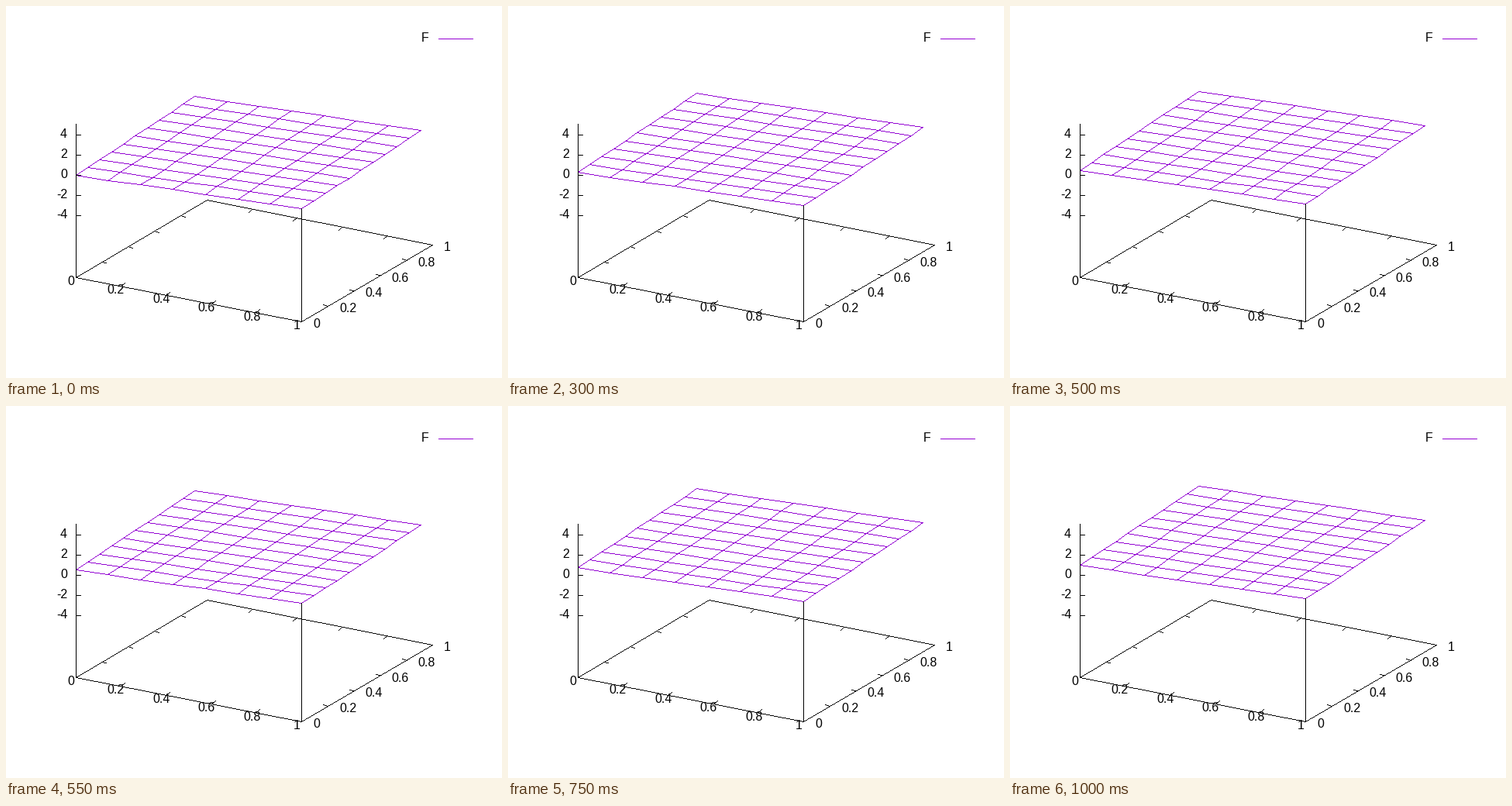
These frames come from a looping animation (640 by 480 pixels, 1050 ms). A matplotlib script:

```python
import numpy as np
import matplotlib.pyplot as plt
from matplotlib.animation import FuncAnimation

W, H = 640, 480
FRAMES = 21
VIOLET = (148, 0, 211)
BLACK = (0, 0, 0)
NX, NY = 7, 10

# Orthographic view: 60 degrees tilt, 30 degrees turn
CENTER = np.array((320, 230))
SCALE = np.array((338, 229))
SIN_TILT, COS_TILT = np.sin(np.pi / 3), np.cos(np.pi / 3)
SIN_TURN, COS_TURN = np.sin(np.pi / 6), np.cos(np.pi / 6)
Z_MIN, Z_MAX = -10, 5
TIC = 6

# Unit screen directions of the x and y axes
X_DIR = np.array((COS_TURN, SIN_TURN * COS_TILT))
Y_DIR = np.array((SIN_TURN, -COS_TURN * COS_TILT))
X_DIR, Y_DIR = X_DIR / np.hypot(*X_DIR), Y_DIR / np.hypot(*Y_DIR)

plt.rcParams["font.family"] = "Liberation Sans"
fig = plt.figure(figsize=(W / 100, H / 100), dpi=100, facecolor="white")


def project(x, y, z=Z_MIN, shift=(0, 0)):
    """Map a 3D point, moved by a pixel shift, to a whole pixel."""
    x, y, z = x - 0.5, y - 0.5, (z - Z_MIN) / (Z_MAX - Z_MIN) - 0.5
    right = x * COS_TURN + y * SIN_TURN
    down = (x * SIN_TURN - y * COS_TURN) * COS_TILT - z * SIN_TILT
    return CENTER + np.trunc(np.array((right, down)) * SCALE + shift).astype(int)


def line(img, a, b, color):
    """One-pixel Bresenham line."""
    a, b = np.array(a), np.array(b)
    major = int(abs(b - a)[1] > abs(b - a)[0])
    if a[major] > b[major]:
        a, b = b, a
    d = b - a
    n = d[major]
    i = np.arange(n + 1)
    pts = np.empty((n + 1, 2), int)
    pts[:, major] = a[major] + i
    other = 1 - major
    pts[:, other] = a[other] + np.sign(d[other]) * ((2 * i * abs(d[other]) + n) // max(2 * n, 1))
    img[pts[:, 1], pts[:, 0]] = color


def surface(img, t):
    pts = [[project(i / NX, j / (NY + 1), i / NX + j / (NY + 1) + t)
            for j in range(NY + 1)] for i in range(NX + 1)]
    for i in range(NX + 1):
        for j in range(NY + 1):
            if i < NX:
                line(img, pts[i][j], pts[i + 1][j], VIOLET)
            if j < NY:
                line(img, pts[i][j], pts[i][j + 1], VIOLET)
    return pts[-1][0]


def axes(img):
    corners = [project(*c) for c in ((0, 0), (1, 0), (1, 1), (0, 1))]
    for a, b in zip(corners, corners[1:] + corners[:1]):
        line(img, a, b, BLACK)
    line(img, corners[0], project(0, 0, Z_MAX), BLACK)
    for z in range(-4, 5, 2):
        p = project(0, 0, z)
        line(img, p, p + (TIC, 0), BLACK)
    for s in (0.2, 0.4, 0.6, 0.8):
        for x, y, d in ((s, 0, Y_DIR), (s, 1, -Y_DIR), (0, s, X_DIR), (1, s, -X_DIR)):
            line(img, project(x, y), project(x, y, shift=TIC * d), BLACK)


def render(k):
    img = np.full((H, W, 3), 255, np.uint8)
    corner = surface(img, k / (FRAMES - 1))
    axes(img)
    line(img, project(1, 0), corner, BLACK)
    line(img, (558, 42), (602, 42), VIOLET)
    return img


def label(x, y, s, ha="left"):
    fig.text(x / W, 1 - y / H, s, ha=ha, va="baseline", size=11.52, color="black")


label(536, 46, "F")
for z in range(-4, 5, 2):
    label(65 if z < 0 else 70, project(0, 0, z)[1] + 4, str(z))
for i in range(6):
    s = f"{i / 5:g}"
    x, y = project(i / 5, 0, shift=-8 * Y_DIR)
    label(x - 0.3, y + 5, s, "center")
    x, y = project(1, i / 5, shift=15 * X_DIR)
    label(x, y + 4, s)

picture = fig.figimage(render(0), origin="upper")


def update(k):
    picture.set_data(render(k))
    return (picture,)


anim = FuncAnimation(fig, update, frames=FRAMES, interval=50, repeat=True, repeat_delay=0)
plt.show()
```
